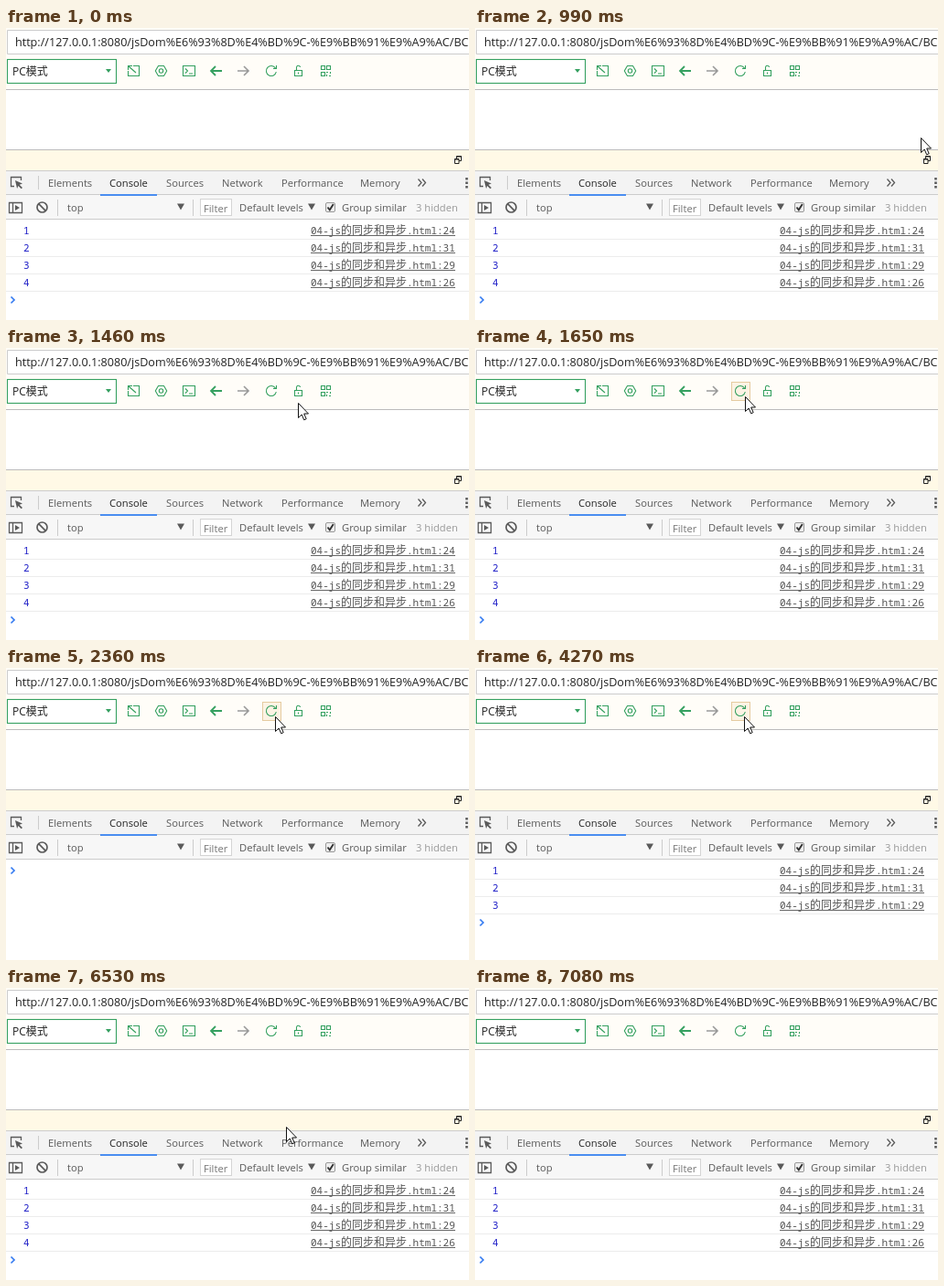
An HTML page that plays this animation: 506 by 320 pixels, repeating every 7160 ms.

```html
<!DOCTYPE html>
<html lang="zh">
<head>
<meta charset="utf-8">
<title>Console: sync and async</title>
<style>
html, body { margin: 0; width: 100%; height: 100%; overflow: hidden; background: #fff; }
svg { display: block; width: 506px; height: 320px; }
text { font: 11.2px "Open Sans", "Noto Sans CJK SC", "Noto Sans CJK", sans-serif; fill: #5a5a5a; white-space: pre; }
.url { font-size: 12.6px; fill: #222; }
.mode { font-size: 12px; fill: #222; }
.mono { font: 11px "Noto Sans Mono", "Noto Sans CJK SC", "Noto Sans CJK", monospace; fill: #545454; }
.mono tspan { font-size: 12px; }
.count { fill: #2020c8; }
.line { fill: none; stroke: #ccc; }
.edge { stroke: #bbb; }
.green { fill: none; stroke: #35a060; stroke-width: 1.1; }
.dark { fill: none; stroke: #5a5a5a; stroke-width: 1.3; }
</style>
</head>
<body>
<svg viewBox="0 0 506 320">
  <!-- address bar and toolbar -->
  <rect width="506" height="67" fill="#fffdf8"/>
  <path d="M506 2.5H1.5V28.5H506" class="line" style="fill:#fff"/>
  <text x="10" y="20" class="url">http://127.0.0.1:8080/jsDom%E6%93%8D%E4%BD%9C-%E9%BB%91%E9%A9%AC/BC</text>
  <path d="M0 67.5H506M0 133.5H506" class="line edge"/>
  <rect x="1.5" y="34.5" width="119" height="26" class="green" style="fill:#fff"/>
  <text x="7" y="51.5" class="mode">PC模式</text>
  <path d="M109 45h6l-3 4z" fill="#35a060"/>
  <rect id="hover" x="280.5" y="37.5" width="20" height="20" fill="#fdf3e4" stroke="#e5cba0"/>
  <g class="green">
    <path d="M139 41.5H145.5V52.5H133.5V47M142 49L134 42M133.5 46V41.5H138"/>
    <path d="M166.5 41.5h6l1.200 2 2 3.500-2 3.500-1.200 2h-6l-1.200-2-2-3.500 2-3.500z"/>
    <circle cx="169.500" cy="47" r="2.200"/>
    <path d="M193.500 41.500h13v11h-13zM196 44.500l2.500 2.500-2.500 2.500M200 50h4"/>
    <path d="M224 47H236M229 42l-5 5 5 5" stroke-width="1.800"/>
    <path d="M253 47H265M260 42l5 5-5 5" stroke="#999" stroke-width="1.600"/>
    <path d="M294.500 44A5.500 5.500 0 1 0 295.300 48M295.500 41V44.500H292"/>
    <path d="M315.500 46.500h8v6h-8zM317.500 46.500V43.500a2 2 0 0 1 4 -.5M319.500 48.500v2"/>
    <path d="M344.500 41.500h4v4h-4zM350.500 41.500h4v4h-4zM344.500 48.500h4v4h-4zM350 48.500h2M354.500 48v2M350.500 51v2M353 52.500h2"/>
  </g>

  <!-- tools panel -->
  <rect y="134" width="506" height="22" fill="#fff9e6"/>
  <path d="M492.500 143V140.500H497.500V145.500H495M490.500 143.500h4.500v5h-4.500zM492 141h6M490 144h5" fill="none" stroke="#222"/>
  <rect y="156" width="506" height="27" fill="#f3f3f3"/>
  <rect y="183" width="506" height="26" fill="#f7f7f7"/>
  <path d="M0 156.500H506M0 182.500H506M0 209.500H506M35.500 162V177M56.500 188V206M204.500 188V206" class="line"/>
  <rect x="103" y="182" width="62" height="2" fill="#4a8df0"/>
  <g id="labels"></g>
  <g class="dark">
    <path d="M9 173.500H5.500V163.500H16.500V167"/>
    <path d="M10 167l8 3.500-3.300 1.200 3.300 3.300-1.300 1.300-3.300-3.300-1.300 3z" fill="#5a5a5a" stroke="none"/>
    <path d="M450.500 165.500l3.500 4-3.500 4M455 165.500l3.500 4-3.500 4"/>
    <path d="M503.500 164v2.500M503.500 168.500v2.500M503.500 173v2.500" stroke-width="2.600"/>
    <path d="M3.500 191.500h14v11h-14zM7.500 191.500v11"/>
    <path d="M10 194l5 3-5 3z" fill="#5a5a5a" stroke="none"/>
    <circle cx="39.500" cy="196.500" r="5.500" stroke-width="1.700"/>
    <path d="M35.700 192.700l7.600 7.600" stroke-width="1.700"/>
    <path d="M187 192.500h8l-4 7zM330 192.500h8l-4 7z" fill="#5a5a5a" stroke="none"/>
    <rect x="212.500" y="187.500" width="34" height="18" fill="#fff" stroke="#d4d4d4" stroke-width="1"/>
    <rect x="349.500" y="191.500" width="10" height="10" rx="1.500" fill="#eee" stroke="#999" stroke-width="1"/>
    <path d="M351.500 196.500l2.300 2.800 4-6.300" stroke="#333" stroke-width="1.900"/>
  </g>
  <text x="216" y="202" style="fill:#757575">Filter</text>

  <!-- console output -->
  <g id="rows"></g>
  <path id="prompt" d="M5.500 -3.500l3.500 3.500-3.500 3.500" fill="none" stroke="#367cf1" stroke-width="1.700"/>
  <path id="cursor" d="M.5 .5V16.500L4.200 13L6.700 18.800L9.200 17.700L6.700 12H11.500Z" fill="#fff" stroke="#111"/>
</svg>
<script>
const $ = id => document.getElementById(id);
const LOOP = 7160, ROW = 19;

const labels = [
  ["Elements", 46, 174], ["Console", 113, 174, "#222"], ["Sources", 175, 174],
  ["Network", 236, 174], ["Performance", 301, 174], ["Memory", 387, 174],
  ["top", 67, 201], ["Default levels", 255, 201],
  ["Group similar", 367, 201], ["3 hidden", 448, 201, "#999"]
];
$("labels").innerHTML = labels.map(([s, x, y, c = "#5a5a5a"]) =>
  `<text x="${x}" y="${y}" style="fill:${c}">${s}</text>`).join("");

$("rows").innerHTML = [24, 31, 29, 26].map((line, i) => {
  const y = 226 + i * ROW;
  return `<g><text x="19" y="${y}" class="mono count">${i + 1}</text>
    <text x="333" y="${y}" class="mono">04-js<tspan>的同步和异步</tspan>.html:${line}</text>
    <path d="M333 ${y + 1.5}H491" stroke="#666"/>
    <path d="M0 ${y + 5.5}H506" stroke="#ececec"/></g>`;
}).join("");
const rows = [...$("rows").children];

// [time, visible rows]
const output = [[0, 4], [2250, 0], [3270, 2], [4270, 3], [6020, 4]];

// [time, x, y] of the pointer tip
const path = [
  [960, 500, 132], [1080, 449, 86], [1210, 409, 68], [1400, 335, 64], [1500, 308, 58],
  [1650, 295, 53], [2190, 295, 53], [2200, 294, 53], [6060, 294, 53],
  [6190, 306, 150], [6530, 306, 150], [6610, 326, 306], [7080, 326, 306]
];

function pointer(t) {
  const i = path.findIndex(p => p[0] > t);
  if (i < 1) return null;
  const [t0, x0, y0] = path[i - 1], [t1, x1, y1] = path[i];
  const k = (t - t0) / (t1 - t0);
  return [x0 + (x1 - x0) * k, y0 + (y1 - y0) * k];
}

const show = (el, on) => el.setAttribute("visibility", on ? "visible" : "hidden");

function draw(now) {
  const t = now % LOOP;
  const count = output.filter(o => o[0] <= t).pop()[1];
  rows.forEach((row, i) => show(row, i < count));
  $("prompt").setAttribute("transform", `translate(0 ${222 + count * ROW})`);

  const p = pointer(t);
  show($("cursor"), p);
  show($("hover"), p && p[0] > 280 && p[0] < 301 && p[1] > 37 && p[1] < 58);
  if (p) $("cursor").setAttribute("transform", `translate(${p.map(Math.round)})`);
}

const start = performance.now();
function tick() {
  draw(performance.now() - start);
  requestAnimationFrame(tick);
}
tick();
</script>
</body>
</html>
```
